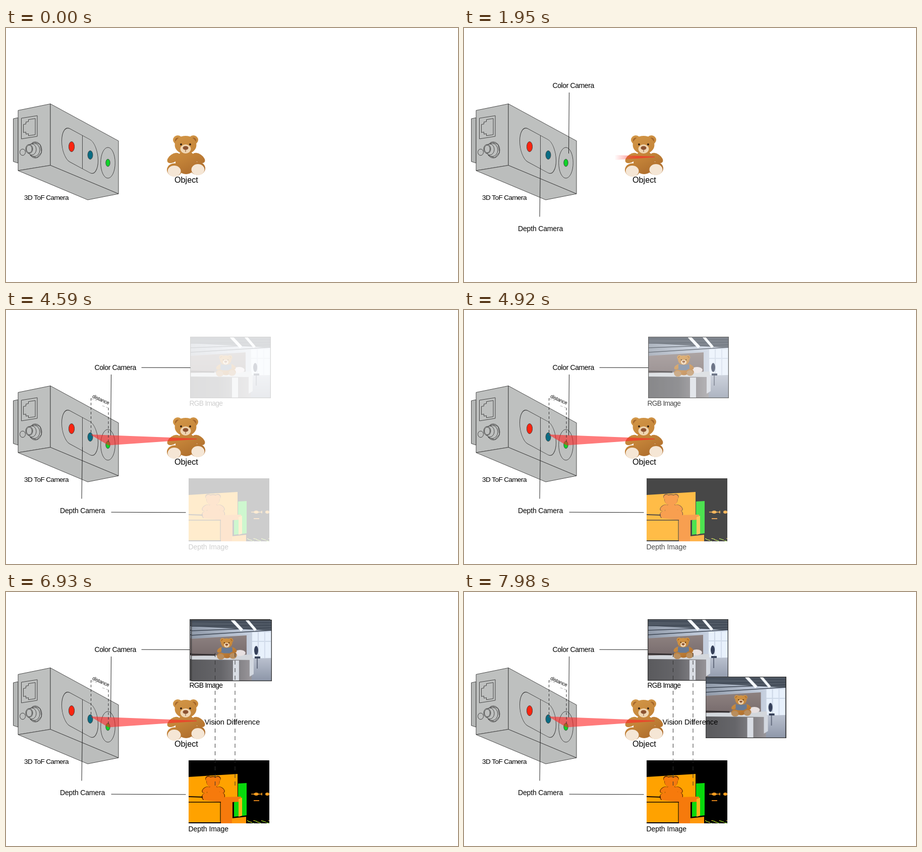
Animation of 896 by 504 pixels, one loop 8 s. Source, as an HTML page with a canvas:

```html
<!DOCTYPE html>
<html lang="en">
<head>
<meta charset="utf-8">
<title>3D ToF Camera</title>
<style>
html, body { margin: 0; width: 100%; height: 100%; overflow: hidden; background: #fff; }
canvas { display: block; width: 100vw; height: 100vh; }
</style>
</head>
<body>
<canvas id="stage" width="896" height="504"></canvas>
<script>
const LOOP = 8000;
const INK = '#3c3c3c';
const SIDES = [-1, 1];
const ctx = document.getElementById('stage').getContext('2d');

const ramp = (t, a, b) => Math.min(1, Math.max(0, (t - a) / (b - a)));

function paint(c, fill, stroke, width = 0.9) {
  if (fill) { c.fillStyle = fill; c.fill(); }
  if (stroke) { c.strokeStyle = stroke; c.lineWidth = width; c.stroke(); }
}
// A four-sided face with upright left and right edges.
function face(c, x1, top1, bottom1, x2, top2, bottom2, fill, stroke) {
  c.beginPath();
  c.moveTo(x1, top1);
  c.lineTo(x2, top2);
  c.lineTo(x2, bottom2);
  c.lineTo(x1, bottom1);
  c.closePath();
  paint(c, fill, stroke);
}
function oval(c, x, y, rx, ry, fill, stroke, angle = 0) {
  c.beginPath();
  c.ellipse(x, y, rx, ry, angle, 0, Math.PI * 2);
  paint(c, fill, stroke);
}
function line(c, x1, y1, x2, y2, color = '#222', width = 1, dash = []) {
  c.setLineDash(dash);
  c.beginPath();
  c.moveTo(x1, y1);
  c.lineTo(x2, y2);
  paint(c, null, color, width);
  c.setLineDash([]);
}
function label(text, x, y, size = 14, spacing = 0) {
  ctx.font = size + 'px "Liberation Sans", Arial, sans-serif';
  ctx.letterSpacing = spacing + 'px';
  ctx.fillStyle = '#000';
  ctx.fillText(text, x, y);
}
function saved(c, draw) {
  c.save();
  draw();
  c.restore();
}
function fade(alpha, draw) {
  if (alpha > 0) saved(ctx, () => { ctx.globalAlpha = alpha; draw(); });
}
function picture(w, h, draw) {
  const el = document.createElement('canvas');
  el.width = w;
  el.height = h;
  draw(el.getContext('2d'));
  return el;
}
function shade(c, x1, y1, x2, y2, ...colors) {
  const g = c.createLinearGradient(x1, y1, x2, y2);
  colors.forEach((color, i) => g.addColorStop(i / (colors.length - 1), color));
  return g;
}

// Seated bear centred on its belly; a flat colour gives a silhouette.
function bear(c, x, y, scale, { flat, shirt } = {}) {
  const fur = flat || shade(c, -20, -50, 20, 35, '#d29647', '#c38338', '#a8672a');
  saved(c, () => {
    c.translate(x, y);
    c.scale(scale, scale);
    for (const s of SIDES) {
      oval(c, 15.5 * s - 1, -42, 9.5, 9, fur);
      if (!flat) oval(c, 15.5 * s - 1, -41, 5.5, 5.5, '#a5662a');
      oval(c, 25 * s, -6, 14, 8, fur, null, 0.6 * s);
    }
    oval(c, 0, 3, 21, 23, fur);
    if (shirt) {
      c.fillStyle = shirt;
      c.fillRect(-21, -15, 42, 22);
    }
    oval(c, -1, -32, 21.5, 18, fur);
    for (const s of SIDES) {
      oval(c, 23 * s, 16 - 1.5 * s, 15, 13, fur);
      if (flat) continue;
      oval(c, 23.5 * s, 18.5 - 1.5 * s, 13, 11, shirt ? '#b98e5e' : '#f5e6d5');
      oval(c, 9 * s - 1, -33, 1.9, 2.1, '#2e1c0e');
    }
    if (flat) return;
    oval(c, -1, -24, 10.5, 9, '#f0d6b2');
    oval(c, -1, -26, 5.5, 3.8, '#8b5230');
    line(c, -1, -23, -1, -18, '#815034');
  });
}

const colorView = picture(160, 122, c => {
  c.fillStyle = shade(c, 0, 0, 160, 0, '#8f99a8', '#b5bfcf', '#d9e3f2');
  c.fillRect(0, 0, 160, 122);
  face(c, 0, 0, 13, 160, 0, 22, '#505965');
  for (let i = 0; i < 4; i++) line(c, 0, 4 + 9 * i, 160, 6 + 5 * i, '#3c4552', 1.5);
  for (const i of [0, 1]) line(c, 81 + 29 * i, 0, 101 + 27 * i, 21, '#f6faff', 6 - i);
  for (let i = 0; i < 3; i++) {
    c.fillStyle = '#e8f1fc';
    c.fillRect(121 + 13 * i, 25, 11, 51);
    line(c, 121 + 13 * i, 43, 132 + 13 * i, 43, '#b4c2d4');
  }
  face(c, 110, 78, 122, 160, 76, 122, shade(c, 0, 76, 0, 122, '#bac1cf', '#8d96a8'));
  face(c, 0, 38, 74, 110, 31, 72, shade(c, 0, 32, 0, 74, '#8d8180', '#776b6c'));
  // desk
  face(c, 0, 78, 122, 120, 78, 122, shade(c, 0, 0, 120, 0, '#5a5a5d', '#66666a', '#9a979b'));
  face(c, 0, 72, 79, 122, 69, 80, '#d3d7dc');
  face(c, 83, 81, 122, 95, 81, 122, '#d9dde4');
  face(c, 116, 78, 113, 124, 77, 108, '#d3d8e0');
  line(c, 0, 69, 48, 70, '#342f31', 3);
  oval(c, 97, 66, 11, 6, '#e7e0e1');
  // chair
  oval(c, 129, 61, 4, 9, '#35405a');
  line(c, 126, 75, 137, 75, '#39445b', 4);
  line(c, 131, 77, 131, 97, '#4c5567', 1.5);
  bear(c, 71, 63, 0.52, { shirt: '#687a94' });
  c.strokeStyle = '#333';
  c.strokeRect(0.5, 0.5, 159, 121);
});

const depthView = picture(160, 125, c => {
  const amber = '#ffa200', rust = '#f67a0c';
  c.fillStyle = '#000';
  c.fillRect(0, 0, 160, 125);
  face(c, 90, 84, 112, 115, 45, 109, '#08d80c');
  face(c, 98, 46, 110, 115, 45, 109, '#08d80c');
  face(c, 0, 33, 82, 97, 27, 78, amber);
  // bear and desk
  bear(c, 49, 62, 0.61, { flat: '#4d2000' });
  bear(c, 49, 62, 0.58, { flat: rust });
  face(c, 30, 74, 86, 104, 72, 82, rust);
  face(c, 0, 75, 123, 64, 83, 123, amber);
  face(c, 64, 80, 125, 87, 77, 125, rust);
  line(c, 0, 72, 28, 73, '#120900', 2);
  line(c, 0, 83, 64, 83, '#120900', 1.5);
  line(c, 63, 83, 63, 123, '#120900', 1.2);
  face(c, 99, 77, 112, 106, 74, 110, '#f8b719');
  face(c, 86, 115, 125, 114, 112, 125, '#ff9808');
  // scattered echoes
  line(c, 124, 67, 146, 67, '#ee961d', 1.5);
  for (const i of [0, 1, 2]) oval(c, 134 + 11 * i, 67, i === 1 ? 1 : 5 - i / 2, 3, '#f39c20');
  line(c, 129, 80, 140, 80, '#dc811a', 2);
  for (let i = 0; i < 28; i++) {
    c.fillStyle = i % 3 ? '#82ce22' : '#deb822';
    c.fillRect(116 + (i * 17) % 44, 119 + (i * 7) % 6, 2, 1);
  }
});

function port() {
  saved(ctx, () => {
    ctx.transform(1, -0.16, 0, 1, 30.5, 179);
    ctx.strokeStyle = INK;
    ctx.lineWidth = 0.9;
    ctx.strokeRect(0, 0, 31.5, 41);
    // stepped plug outline, mirrored about its middle
    ctx.beginPath();
    for (const s of SIDES) {
      for (let i = 0; i < 3; i++) {
        const step = s < 0 ? i : 2 - i;
        const reach = 21 + s * (8 + 4 * step);
        const next = 21 + s * (8 + 4 * (step + (s < 0 ? 1 : -1)));
        ctx.lineTo(4 + 5 * step, reach);
        if (i < 2) ctx.lineTo(4 + 5 * (step + (s < 0 ? 1 : 0)), s < 0 ? reach : reach);
        if (i < 2 && s > 0) ctx.lineTo(4 + 5 * step, next);
      }
      if (s < 0) { ctx.lineTo(27.5, 5); ctx.lineTo(27.5, 37); }
    }
    ctx.closePath();
    ctx.stroke();
  });
}

function knob() {
  oval(ctx, 58, 242, 13, 16, null, INK);
  ctx.beginPath();
  for (let i = 0; i < 6; i++) {
    const a = i * Math.PI / 3 + 0.3;
    ctx.lineTo(58 + 13 * Math.cos(a), 242 + 16 * Math.sin(a));
  }
  ctx.closePath();
  paint(ctx, null, INK);
  for (let i = 0; i < 3; i++) oval(ctx, 56 - 5 * i, 242 - i, 11 - 2 * i, 13 - 2 * i, '#bec0bf', INK);
  oval(ctx, 46, 240, 5.5, 7.5, null, INK);
  oval(ctx, 33, 246.5, 5.5, 6.3, null, INK);
}

function camera() {
  face(ctx, 14.5, 180, 265, 24, 178, 268, '#b5b7b6', INK);
  face(ctx, 24, 163.5, 283, 88, 150.5, 272.5, '#bec0bf', INK);
  face(ctx, 88, 150.5, 272.5, 223, 224, 329, '#bec0bf', INK);
  ctx.beginPath();
  ctx.moveTo(24, 283);
  ctx.lineTo(88, 272.5);
  ctx.lineTo(223, 329);
  ctx.lineTo(162, 341);
  ctx.closePath();
  paint(ctx, '#bbbdbc', INK);
  port();
  knob();
  saved(ctx, () => {
    ctx.transform(1, 0.54, 0, 1, 0, 0);
    ctx.beginPath();
    ctx.roundRect(110.5, 131.5, 72, 66, { x: 16, y: 33 });
    paint(ctx, null, INK);
  });
  line(ctx, 151.5, 213, 151.5, 279, INK, 0.9);
  oval(ctx, 202, 267.5, 14.3, 30.5, null, INK);
  oval(ctx, 130, 235.5, 5.6, 10, '#fb2410', INK);
  oval(ctx, 167, 252, 5, 8.5, '#096c83', INK);
  oval(ctx, 202, 267.5, 4.2, 7.3, '#10d329', INK);
  label('3D ToF Camera', 36, 340.5, 13.6, -0.62);
}

function beam(t) {
  const p = ramp(t, 1640, 2640);
  if (!p) return;
  const edge = 378 - 256 * p;
  ctx.beginPath();
  ctx.moveTo(167, 247);
  ctx.lineTo(378, 255);
  ctx.lineTo(378, 256.5);
  ctx.lineTo(203, 268.5);
  paint(ctx, shade(ctx, edge, 0, edge + 45, 0, 'rgba(255,35,35,0)', 'rgba(255,35,35,.6)'));
}

function distance(t) {
  fade(ramp(t, 2640, 3240), () => {
    for (const i of [0, 1]) {
      const x = 168.5 + 34.5 * i, y = 175 + 19 * i;
      line(ctx, x, y, x, y + 72, '#333', 1, [5, 4]);
      line(ctx, 169 + 22 * i, 176 + 14 * i, 180 + 22 * i, 180 + 14 * i, '#999', 0.8, [5, 3]);
    }
  });
  fade(ramp(t, 3300, 4020), () => {
    ctx.translate(170.5, 173.5);
    ctx.rotate(0.42);
    label('distance', 0, 0, 10, -0.2);
  });
}

function draw(t) {
  ctx.fillStyle = '#fff';
  ctx.fillRect(0, 0, 896, 504);
  camera();
  bear(ctx, 357, 264, 1);
  label('Object', 334, 307, 16.2);

  fade(ramp(t, 30, 450), () => line(ctx, 151.5, 272, 150, 374.5));
  fade(ramp(t, 330, 810), () => label('Depth Camera', 107, 402.5, 14, -0.17));
  fade(ramp(t, 840, 1260), () => line(ctx, 207.5, 249, 208.5, 128));
  fade(ramp(t, 1140, 1620), () => label('Color Camera', 175.5, 118.5, 14, -0.4));
  beam(t);
  distance(t);

  const reach = ramp(t, 4080, 4440);
  if (reach) {
    line(ctx, 268.5, 114.2, 268.5 + 97 * reach, 114.5);
    line(ctx, 208.5, 401.2, 208.5 + 148 * reach, 401.8);
  }

  const slide = Math.pow(ramp(t, 6810, 7980), 1.8);
  fade(ramp(t, 4470, 5100), () => {
    if (slide) ctx.drawImage(colorView, 364, 54);
    ctx.drawImage(colorView, 365 + 113.5 * slide, 53 + 115 * slide);
    ctx.drawImage(depthView, 362, 334);
    label('RGB Image', 363.5, 189.5, 13.8, -0.7);
    label('Depth Image', 361.5, 475, 14, -0.06);
  });
  fade(ramp(t, 5100, 5520), () => {
    for (const x of [414.5, 454]) line(ctx, x, 121, x, 385, '#333', 1, [8, 7]);
  });
  fade(ramp(t, 5760, 6390), () => label('Vision Difference', 393.5, 262.5, 14.6));
}

const start = performance.now();
function tick(now) {
  draw(Math.max(0, now - start) % LOOP);
  requestAnimationFrame(tick);
}
draw(0);
requestAnimationFrame(tick);
</script>
</body>
</html>
```
